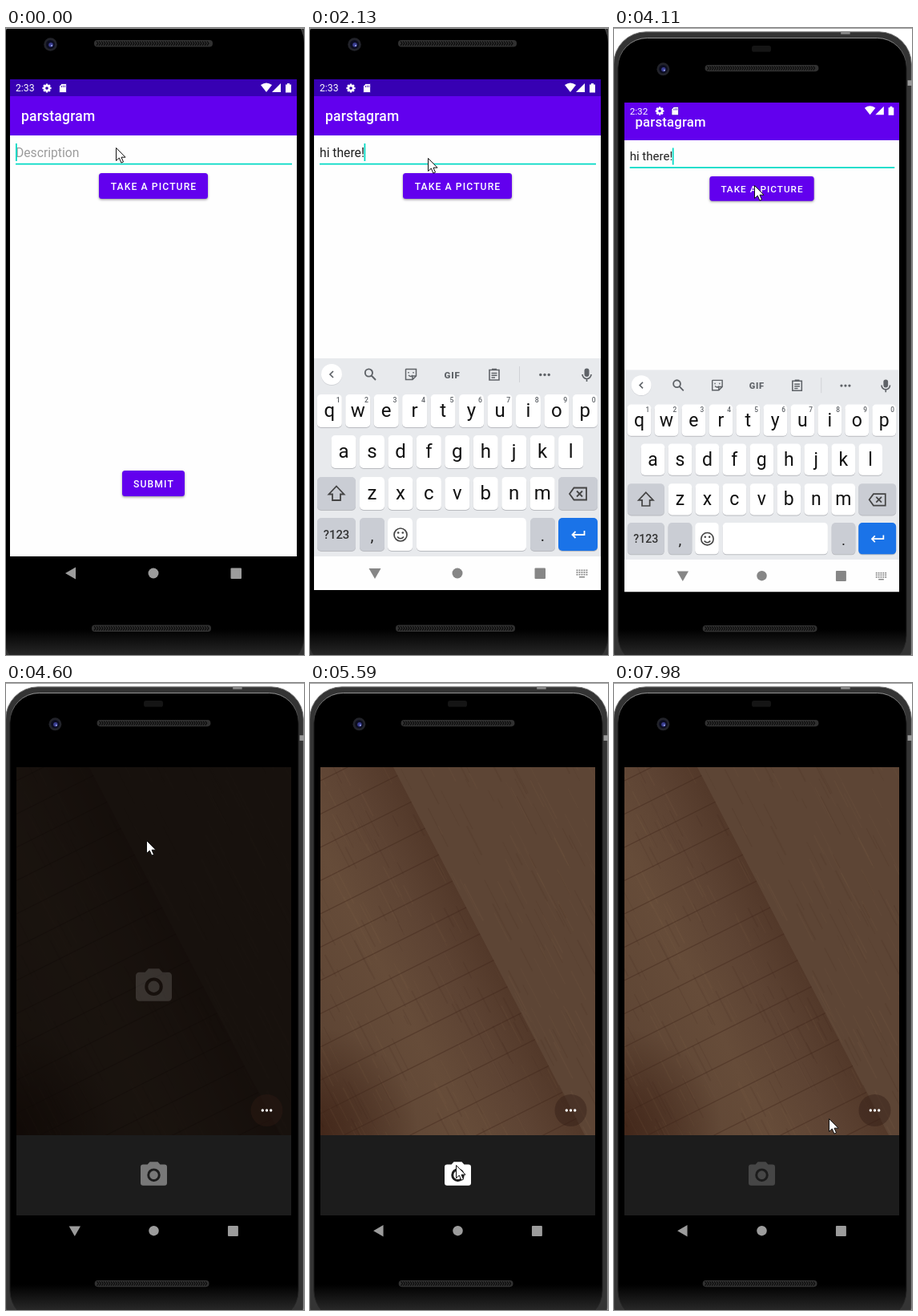
An HTML page with a canvas for the animation above (8 s loop, 372 by 782 pixels).

```html
<!DOCTYPE html>
<html lang="en">
<head>
<meta charset="utf-8">
<title>Photo post demo</title>
<style>
html, body { margin: 0; width: 100%; height: 100%; overflow: hidden; background: #fff; }
canvas { display: block; width: 372px; height: 782px; }
</style>
</head>
<body>
<canvas></canvas>
<script>
const W = 372, H = 782, LOOP = 8000, TAU = Math.PI * 2, ZOOM = 343 / 358;
const PURPLE = '#6200ee', TEAL = '#03dac5', INK = '#5f6368';
const canvas = document.querySelector('canvas');
const dpr = window.devicePixelRatio || 1;
canvas.width = W * dpr;
canvas.height = H * dpr;
const c = canvas.getContext('2d');

const bursts = [[0, 0, 1], [260, 500, 3], [650, 1250, 6], [1390, 1510, 2], [1760, 1760, 1],
  [2130, 2250, 2], [2390, 2390, 1], [2670, 2790, 2], [2930, 3050, 2], [3420, 3420, 1],
  [3580, 3580, 1], [4110, 4350, 3], [4600, 5320, 7], [5470, 5590, 2], [6070, 6310, 3],
  [6570, 6570, 1], [7740, 7980, 3]];
const steps = bursts.flatMap(([a, b, n]) =>
  Array.from({ length: n }, (_, i) => n > 1 ? a + (b - a) * i / (n - 1) : a));

// Linear interpolation through [time, value] points
function at(t, keys) {
  if (t <= keys[0][0]) return keys[0][1];
  for (let i = 1; i < keys.length; i++) {
    const [t0, v0] = keys[i - 1], [t1, v1] = keys[i];
    if (t < t1) return v0 + (v1 - v0) * (t - t0) / (t1 - t0);
  }
  return keys[keys.length - 1][1];
}

function rect(x, y, w, h, fill, r = 0) {
  c.beginPath();
  c.roundRect(x, y, w, h, r);
  c.fillStyle = fill;
  c.fill();
}
function disc(x, y, r, fill) {
  c.beginPath();
  c.arc(x, y, r, 0, TAU);
  c.fillStyle = fill;
  c.fill();
}
function shape(d, x, y, fill, stroke, width = 1.6, scale = 1) {
  const p = new Path2D(d);
  c.save();
  c.translate(x, y);
  c.scale(scale, scale);
  if (fill) { c.fillStyle = fill; c.fill(p, 'evenodd'); }
  if (stroke) { c.strokeStyle = stroke; c.lineWidth = width; c.stroke(p); }
  c.restore();
}
function text(s, x, y, size, fill, { weight = 400, align = 'left', space = 0 } = {}) {
  c.font = `${weight} ${size}px Roboto, sans-serif`;
  c.letterSpacing = space + 'px';
  c.textAlign = align;
  c.fillStyle = fill;
  c.fillText(s, x, y);
}
function clip(x, y, w, h, draw) {
  c.save();
  c.beginPath();
  c.rect(x, y, w, h);
  c.clip();
  draw();
  c.restore();
}

function speaker(x, y, w) {
  rect(x, y, w, 8.5, '#303030', 4);
  let d = '';
  for (let i = 3; i < w - 4; i += 3) d += `M${i} 1.5l2 2.7l-2 2.7`;
  shape(d, x, y, null, '#0a0a0a', 1.2);
}

function body() {
  rect(-9, -28, 388, 850, '#343434', 42);
  c.strokeStyle = '#777';
  c.lineWidth = 1;
  c.stroke();
  rect(374, 35, 6, 7, '#999');
  rect(287, -29, 12, 4, '#8a8a8a');
  const sheen = c.createLinearGradient(0, 750, 0, 795);
  sheen.addColorStop(0, '#000');
  sheen.addColorStop(1, '#363636');
  rect(-3.5, -20, 376, 816, sheen, 38);
  const rim = c.createLinearGradient(0, -20, 0, 20);
  rim.addColorStop(0, '#999');
  rim.addColorStop(1, '#242424');
  c.strokeStyle = rim;
  c.stroke();
  rect(171, -10, 25, 8, '#151515', 3);
  speaker(110, 15, 148);
  speaker(107, 744.5, 149);
  disc(55.5, 20.5, 8.3, '#22232a');
  disc(55.5, 20.5, 5.5, '#0c0d20');
  disc(56, 21, 2.8, '#3b3f92');
  disc(57, 22, 1, '#a5b0f0');
}

function statusBar(clock) {
  text(clock, 12, 79.3, 12.2, '#fff');
  c.save();
  c.translate(51, 75);
  for (let i = 0; i < 8; i++) {
    c.rotate(TAU / 8);
    rect(-1.3, -5.6, 2.6, 3, '#fff', .4);
  }
  c.beginPath();
  c.arc(0, 0, 3, 0, TAU);
  c.strokeStyle = '#fff';
  c.lineWidth = 2.4;
  c.stroke();
  c.restore();
  shape('M3 0H9V11H0V3ZM3 2.5V4.5M5 2V4.5M7 2V4.5', 66.5, 69.5, '#fff', '#3700b3', .8);
  shape('M-7 -8Q0 -13 7 -8L0 1Z', 325, 79, '#fff');
  shape('M0 11L11 0V11Z', 332, 69, '#fff');
  shape('M0 1.5H2V0H5V1.5H7V11.5H0Z', 349, 69, '#fff');
}

function button(label, x, y, w) {
  c.save();
  c.shadowColor = 'rgba(0,0,0,.4)';
  c.shadowBlur = 3 * dpr;
  c.shadowOffsetY = 1.2 * dpr;
  rect(x, y, w, 32, PURPLE, 3.5);
  c.restore();
  text(label, x + w / 2 + .5, y + 20.8, 12.2, '#fff', { weight: 500, align: 'center', space: 1.09 });
}

function form(T, lift) {
  c.save();
  c.translate(0, -lift);
  rect(5, 64, 358, 660, '#fefefe');
  rect(5, 64, 358, 21, lift ? PURPLE : '#3700b3');
  rect(5, 85, 358, 49, PURPLE);
  text('parstagram', 19, 116, 17.5, '#fff', { weight: 500, space: .2 });
  const typed = 'hi there!'.slice(0, Math.max(0, Math.min(9, Math.floor((T - 530) / 102))));
  text(typed || 'Description', 12, 160.5, 15.7, typed ? '#212121' : '#9c9c9c');
  const caret = 12 + (typed ? c.measureText(typed).width - .5 : 0);
  if (T < 2250 || T >= 2790) rect(caret, 144, 1.8, 22, TEAL);
  rect(12, 168.7, 345, 1.8, TEAL);
  button('TAKE A PICTURE', 116, 181, 136);
  const ripple = at(T, [[2390, 0], [2670, .14], [2790, .24], [2930, .12], [3050, 0]]);
  if (ripple) clip(116, 181, 136, 32, () =>
    disc(178, 198, at(T, [[2670, 35], [2790, 80]]), `rgba(255,255,255,${ripple})`));
  button('SUBMIT', 145, 552, 78);
  c.restore();
}

function key(x, y, w, fill = '#fff') {
  rect(x, y + 1, w, 41, '#b9bbc0', 5);
  rect(x, y, w, 41, fill, 5);
}

function toolStrip(open) {
  rect(14, 420, 26, 26, '#d2d4d8', 13);
  disc(27, 432, 13, '#fff');
  shape(open ? 'M2 -4L-2 0L2 4' : 'M-2 -4L2 0L-2 4', 27, 432, null, INK, 1.7);
  rect(342.5, 424.5, 6, 10.5, INK, 3);
  shape('M-5.5 0A5.5 5.5 0 0 0 5.5 0M0 5.5V9', 345.5, 432, null, INK, 1.7);
  if (!open) return;
  shape('M3 -2A4.6 4.6 0 1 1 -6.2 -2A4.6 4.6 0 1 1 3 -2M1.7 1.5L7 7', 75, 432, null, INK, 1.9);
  shape('M-6 -6.5H6.5V2L2 6.5H-6.5V-6ZM2 6V2H6M-3 1Q0 4 2 1M-3 -3V-1.5M3 -3V-1.5', 126, 432, null, INK, 1.5);
  text('GIF', 177.5, 436.5, 11.5, INK, { weight: 900, align: 'center', space: .8 });
  shape('M-6 -5.5H6V7H-6ZM-3 -6.5H3M-3.5 -1.5H3.5M-3.5 1.3H3.5M-3.5 4H1', 230, 432, null, INK, 1.6);
  rect(261, 422, 1, 20, '#d0d2d6');
  for (const x of [287.8, 293, 298.2]) disc(x, 432.5, 1.7, INK);
}

function keyboard(offset, open) {
  c.save();
  c.translate(0, offset);
  rect(5, 412, 358, 250, '#e8eaed');
  toolStrip(open);
  [['qwertyuiop', 24.3, 457], ['asdfghjkl', 42, 508], ['zxcvbnm', 77.5, 560]].forEach(([row, x0, y], r) => {
    [...row].forEach((letter, i) => {
      const x = x0 + i * 35.45;
      key(x - 15.5, y, 31);
      text(letter, x, y + 28.3, 24, '#111', { align: 'center' });
      if (!r) text((i + 1) % 10, x + 10.8, y + 10, 8.7, INK, { weight: 500, align: 'center' });
    });
  });
  const grey = '#cacdd4';
  key(9, 560, 48, grey);
  shape('M0 -9L9.5 1H5V8.5H-5V1H-9.5Z', 33, 580.5, null, '#444', 1.8);
  key(310, 560, 49, grey);
  shape('M-10.5 0L-5 -7.5H10.5V7.5H-5ZM-1.5 -3.5L5.5 3.5M5.5 -3.5L-1.5 3.5', 334.5, 581, null, '#444', 1.8);
  key(9, 611, 48, grey);
  text('?123', 33, 637, 14.8, '#333', { weight: 500, align: 'center' });
  key(62, 611, 31, grey);
  text(',', 77.5, 640, 20, '#222', { align: 'center' });
  key(97, 611, 31);
  shape('M8 0A8 8 0 1 1 -8 0A8 8 0 1 1 8 0M-4 2.5Q0 7 4 2.5', 113, 632, null, '#444', 1.7);
  disc(110.2, 629.5, 1.3, '#444');
  disc(115.8, 629.5, 1.3, '#444');
  key(133, 611, 137);
  key(275, 611, 31, grey);
  text('.', 290.5, 640, 20, '#222', { align: 'center' });
  key(310, 611, 49, '#1a73e8');
  shape('M8 -5V0H-7M-3 -4L-7 0L-3 4', 334.5, 632, null, '#fff', 1.8);
  c.restore();
}

function navBar(T) {
  const light = T >= 260 && T < 4600, ink = light ? '#868686' : '#9c9c9c';
  rect(5, 659, 358, 42, light ? '#fefefe' : '#000');
  c.save();
  c.translate(81, 680);
  c.rotate(at(T, [[0, 0], [260, -.3], [650, -TAU / 4], [4600, -TAU / 4], [4840, -.4], [4960, 0]]));
  shape('M-7 0L6 -7.5V7.5Z', 0, 0, ink);
  c.restore();
  disc(184, 680, 6.5, ink);
  rect(280.5, 673.5, 13.5, 13.5, ink, 1);
  if (!light) return;
  for (let i = 0; i < 15; i++) rect(332.5 + i % 5 * 3, 675.5 + Math.floor(i / 5) * 2.7, 1.9, 1.7, ink);
  rect(336, 684, 7, 1.5, ink);
}

function phone(T, clock) {
  body();
  if (T < 4350) clip(5, 64, 358, 595, () => {
    const lift = T >= 4110 ? 21 : 0;
    form(T, lift);
    if (T >= 4230) rect(5, 260, 358, 400, '#000');
    const drop = at(T, [[0, 250], [259, 250], [260, 170], [380, 60], [500, 8], [650, 0],
      [4110, 0], [4230, 120], [4350, 250]]);
    if (drop < 250) keyboard(drop, T < 770 || T >= 1760);
    statusBar(clock);
  });
  else rect(5, 64, 358, 595, '#000');
  navBar(T);
}

function cameraIcon(x, y, scale, fill) {
  shape('M-3 -9L-4.8 -7H-8A2 2 0 0 0 -10 -5V7A2 2 0 0 0 -8 9H8A2 2 0 0 0 10 7V-5A2 2 0 0 0 8 -7H4.8L3 -9Z' +
    'M5 1A5 5 0 1 1 -5 1A5 5 0 1 1 5 1M3.2 1A3.2 3.2 0 1 1 -3.2 1A3.2 3.2 0 1 1 3.2 1', x, y, fill, null, 0, scale);
}

// Wooden surface seen by the camera: two boards meeting at a slanted edge
function wood() {
  let seed = 7;
  const rnd = () => (seed = seed * 16807 % 2147483647) / 2147483647;
  const grain = (n, x0, x1) => {
    for (let i = 0; i < n; i++) {
      const len = 12 + rnd() * 45, light = rnd() > .5;
      shape(`M0 0l${len * .46} ${len * .89}`, x0 + rnd() * (x1 - x0), 75 + rnd() * 490, null,
        light ? 'rgba(140,110,82,.1)' : 'rgba(45,22,12,.08)', .6 + rnd() * 1.4);
    }
  };
  rect(13, 105, 343, 459, '#5d4535');
  grain(260, 80, 356);
  c.save();
  c.beginPath();
  c.moveTo(13, 105);
  c.lineTo(104, 105);
  c.lineTo(343, 564);
  c.lineTo(13, 564);
  c.clip();
  const g = c.createLinearGradient(13, 440, 225, 330);
  g.addColorStop(0, '#5e4534');
  g.addColorStop(.45, '#664c39');
  g.addColorStop(.75, '#5d4333');
  g.addColorStop(1, '#523829');
  rect(13, 105, 343, 459, g);
  const corner = c.createRadialGradient(5, 560, 10, 5, 560, 130);
  corner.addColorStop(0, 'rgba(58,30,18,.75)');
  corner.addColorStop(1, 'rgba(58,30,18,0)');
  rect(13, 105, 343, 459, corner);
  grain(260, 0, 300);
  for (let y = 122; y < 760; y += 41.5) shape(`M13 ${y}l340 -170`, 0, 0, null, 'rgba(62,36,24,.42)', 1.2);
  c.restore();
}

function camera(T) {
  rect(13, 93, 343, 571, '#000');
  clip(13, 105, 343, 459, () => {
    wood();
    rect(13, 105, 343, 459, `rgba(0,0,0,${at(T, [[4600, .75], [4720, .4], [4840, .19], [5320, 0]])})`);
    const ghost = at(T, [[4600, .14], [4840, .12], [5200, 0]]);
    if (ghost) cameraIcon(184.5, 376.5, 2.25, `rgba(255,255,255,${ghost})`);
  });
  disc(325.5, 533, 20, 'rgba(48,28,20,.42)');
  for (const x of [320.3, 325.5, 330.7]) disc(x, 533, 1.7, '#fff');
  rect(13, 564, 343, 100, '#1c1c1c');
  if (T >= 6070 && T < 6570) clip(13, 564, 343, 100, () =>
    disc(184.5, 613, at(T, [[6070, 50], [6310, 180]]), '#282828'));
  const v = at(T, [[4600, 120], [4840, 196], [5320, 255], [6070, 255], [6190, 160], [6310, 70]]);
  cameraIcon(184.5, 612, 1.65, `rgb(${v},${v},${v})`);
}

function pointer(T) {
  const path = [[0, 137, 149], [1250, 137, 149], [1390, 139, 161], [1510, 143, 161], [1760, 147, 162],
    [2130, 147, 162], [2250, 157, 171], [2390, 175, 196], [4840, 175, 196], [5320, 160, 626],
    [5470, 170, 614], [5590, 182, 601], [6570, 182, 601], [7740, 215, 562], [7860, 262, 536], [7980, 268, 543]];
  const x = at(T, path.map(p => [p[0], p[1]])), y = at(T, path.map(p => [p[0], p[2]]));
  shape('M0 0V16L3.8 12.6L6.4 18.6L9 17.5L6.5 11.7H11.5Z', x + .5, y + .5, '#fff', '#111', 1);
}

function zoomedOut(T) {
  rect(0, 0, W, H, '#fff');
  c.save();
  c.translate(13 - 5 * ZOOM, 93 - 64 * ZOOM);
  c.scale(ZOOM, ZOOM);
  phone(T, '2:32');
  c.restore();
  if (T >= 4600) camera(T);
}

function render(t) {
  const T = steps.filter(s => s <= t).pop();
  c.setTransform(dpr, 0, 0, dpr, 0, 0);
  if (T < 3580) phone(T, '2:33');
  if (T >= 3420) {
    c.globalAlpha = T < 3580 ? .5 : 1;
    zoomedOut(T);
    c.globalAlpha = 1;
  }
  rect(0, 0, W, 1, '#a0a0a0');
  pointer(T);
}

const start = performance.now();
function tick() {
  render((performance.now() - start) % LOOP);
  requestAnimationFrame(tick);
}
tick();
</script>
</body>
</html>
```
